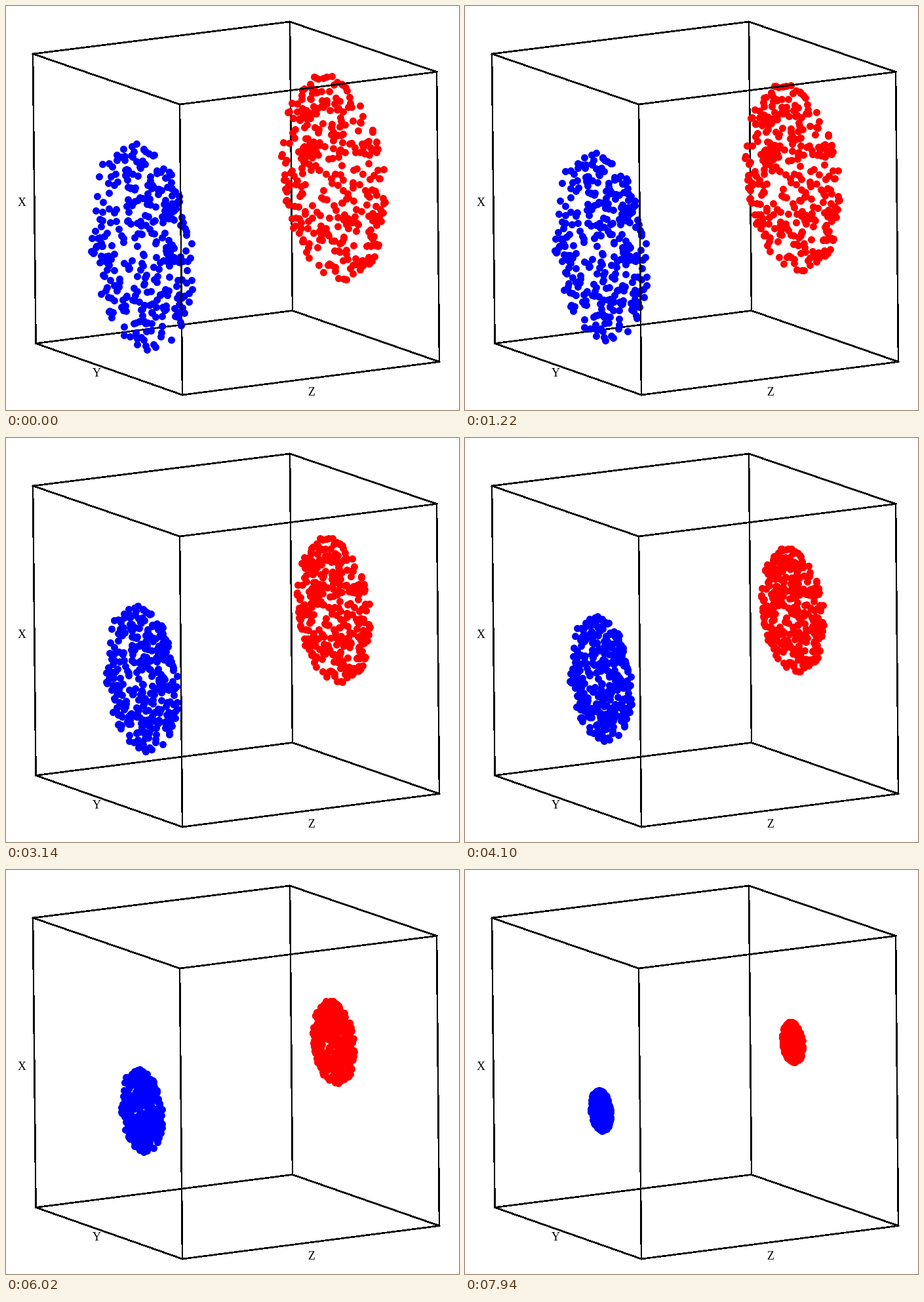
Animation of 691x616 px, one loop 8 s. Source, as a matplotlib script:

```python
import numpy as np
import matplotlib.pyplot as plt
from matplotlib.animation import FuncAnimation

W, H, DPI = 691, 616, 100
TICK, LOOP = 20, 8000
HOLD, STEP = 500, 120      # ms: opening pause, then one shrink step each
STEPS_TO_POINT = 78.6      # steps until a disc would vanish
DOT = 11                   # dot diameter in px
ACROSS, DOWN = np.array([80, 28]), np.array([1.5, 156])  # disc radii on screen

px = 72 / DPI


def disc(center, count, knots, seed):
    """Offsets from the center: an evenly filled disc with a few dense knots."""
    rng = np.random.default_rng(seed)
    r = np.sqrt(rng.random(count))
    a = 2 * np.pi * rng.random(count)
    parts = [np.outer(r * np.cos(a), ACROSS) + np.outer(r * np.sin(a), DOWN)]
    for knot in knots:
        parts.append(rng.normal(np.subtract(knot, center), (7, 9), (16, 2)))
    return np.vstack(parts)


blue_c, red_c = np.array([207, 366.6]), np.array([499.5, 262.5])
clouds = [
    (red_c, disc(red_c, 340, [(460, 221)], 4), "#ff0000"),
    (blue_c, disc(blue_c, 310, [(254, 308), (252, 376)], 9), "#0000ff"),
]

fig = plt.figure(figsize=(W / DPI, H / DPI), dpi=DPI, facecolor="white")
ax = fig.add_axes([0, 0, 1, 1])
ax.set_xlim(0, W)
ax.set_ylim(H, 0)
ax.axis("off")

# Box corners: left, back, right, front
top = [(41, 73), (433, 24), (657, 100.5), (265, 150)]
bottom = [(45.5, 514.5), (437, 464.5), (661, 542.5), (269, 593)]


def edge(p, q, z):
    ax.plot(*zip(p, q), color="black", lw=1.6 * px, zorder=z,
            antialiased=False)


for i in range(4):
    j = (i + 1) % 4
    z = 1 if i < 2 else 3  # far edges lie behind the dots
    edge(top[i], top[j], z)
    edge(bottom[i], bottom[j], z)
    edge(top[i], bottom[i], z)

for name, x, y in [("X", 24.5, 305), ("Y", 138.5, 565), ("Z", 465.5, 594)]:
    ax.text(x, y, name, family="Liberation Serif", fontsize=18 * px,
            ha="center", va="baseline")

dots = [ax.scatter(*(c + d).T, s=(DOT * px) ** 2, c=color, linewidths=0,
                   antialiased=False, zorder=2) for c, d, color in clouds]


def draw(frame):
    t = frame * TICK
    n = 0 if t < HOLD else (t - HOLD) // STEP + 1
    k = 1 - n / STEPS_TO_POINT
    for art, (c, d, _) in zip(dots, clouds):
        art.set_offsets(c + k * d)
    return dots


anim = FuncAnimation(fig, draw, frames=LOOP // TICK, interval=TICK,
                     repeat=True, repeat_delay=0, blit=False)
plt.show()
```
